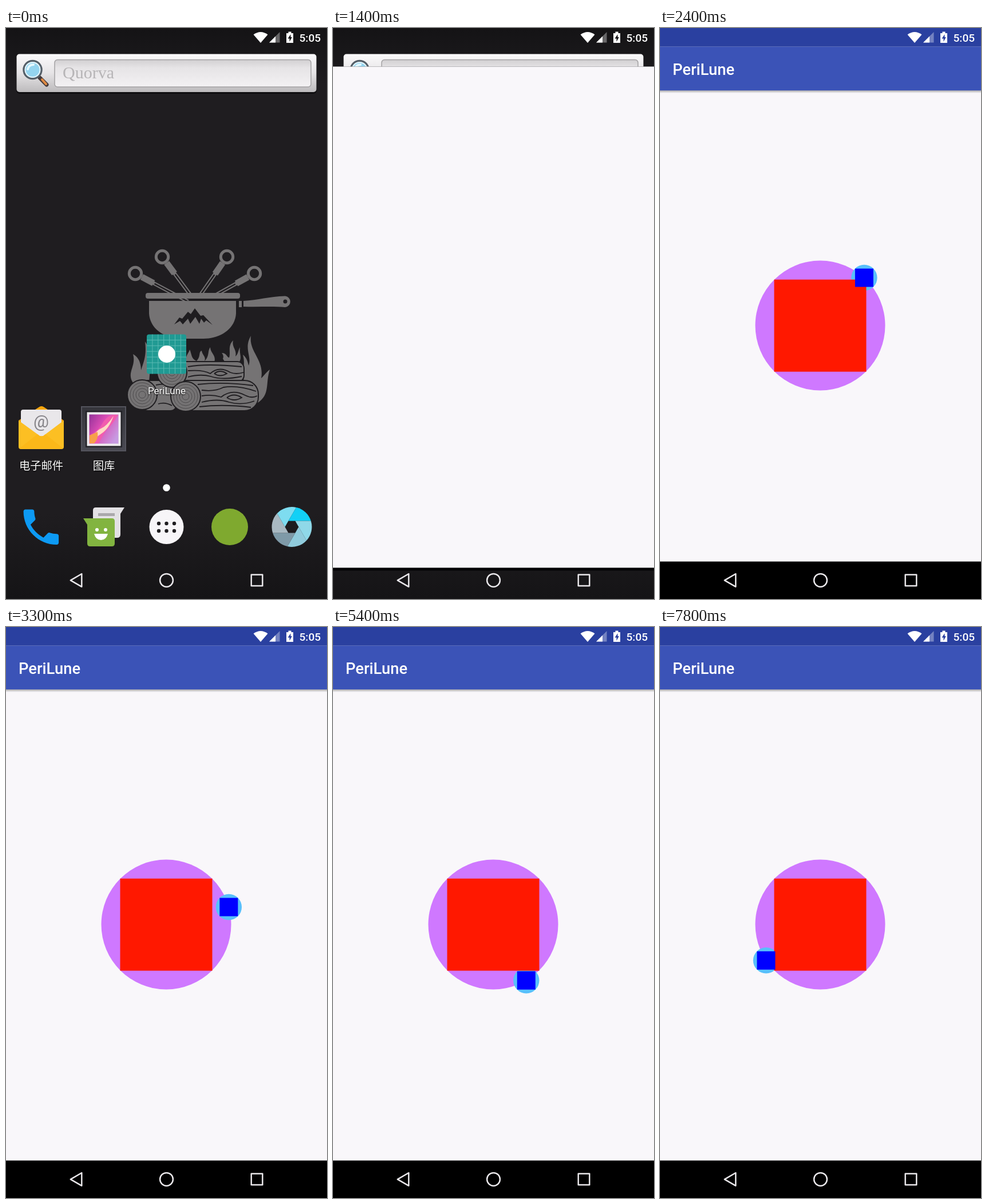
An HTML page for the animation above (8 s loop, 561 px wide and 998 px high).

```html
<!DOCTYPE html>
<html lang="zh">
<head>
<meta charset="utf-8">
<style>
html, body { margin: 0; width: 100%; height: 100%; overflow: hidden; background: #1f1d20; }
svg { display: block; width: 100vw; height: 100vh; }
text { font-family: Roboto, "Noto Sans CJK SC", "Noto Sans CJK", sans-serif; fill: #fff; }
.label { text-anchor: middle; filter: drop-shadow(0 1px 1px #000); }
.g { fill: #757374; }
.gs { stroke: #757374; fill: none; }
.d { fill: #1f1d20; }
.ds { stroke: #1f1d20; fill: none; }
</style>
</head>
<body>
<svg viewBox="0 0 561 998">
  <defs>
    <linearGradient id="wall" x2="0" y2="1">
      <stop stop-color="#141315"/><stop offset=".1" stop-color="#1f1d20"/>
      <stop offset=".85" stop-color="#1f1d20"/><stop offset="1" stop-color="#151416"/>
    </linearGradient>
    <linearGradient id="plate" x2="0" y2="1">
      <stop stop-color="#fbfafb"/><stop offset=".5" stop-color="#e6e4e6"/><stop offset="1" stop-color="#bcbabc"/>
    </linearGradient>
    <linearGradient id="field" x2="0" y2="1">
      <stop stop-color="#d2d0d2"/><stop offset=".3" stop-color="#e6e4e6"/><stop offset="1" stop-color="#f3f1f3"/>
    </linearGradient>
    <linearGradient id="frame" x2="0" y2="1">
      <stop stop-color="#34343a"/><stop offset="1" stop-color="#4a4a53"/>
    </linearGradient>
    <linearGradient id="photo" x2="1" y2=".6">
      <stop stop-color="#8c2f96"/><stop offset=".45" stop-color="#d94bb4"/><stop offset="1" stop-color="#c79be2"/>
    </linearGradient>
    <linearGradient id="shade" x2="0" y2="1">
      <stop stop-color="#000" stop-opacity=".32"/><stop offset="1" stop-color="#000" stop-opacity="0"/>
    </linearGradient>
  </defs>

  <g id="home">
    <rect width="561" height="998" fill="url(#wall)"/>

    <g id="forks"></g>
    <rect class="g" x="244" y="463" width="165" height="10" rx="4"/>
    <path class="g" d="M250 477H402V499C400 528 372 543 345 543H308C280 543 252 528 250 499Z"/>
    <path class="g" d="M407 477h5v11h-5zM415 477C440 476 460 469 488 468.500A9.800 9.800 0 0 1 488 488C465 486 440 488 415 487Z"/>
    <circle class="d" cx="488" cy="478" r="3.500"/>
    <path class="d" d="M294 518L303 506 308 508 318 496 323 500 330 490 340 503 345 502 361 519 350 511 346 515 341 508 338 517 331 505 322 517 318 508 309 518 304 512Z"/>

    <path class="g" d="M222 620C210 602 228 592 222 570C235 577 236 592 236 598C241 582 246 572 243 548C252 560 254 580 250 618Z
      M440 655C462 640 453 622 461 597C454 602 449 610 446 612C452 580 424 566 428 538C415 560 430 574 424 590C422 580 419 575 414 571C419 590 412 595 416 618Z
      M314 586C313 572 320 568 321 562C325 570 323 578 333 582C341 574 336 566 342 564C343 572 350 574 347 582C356 574 352 564 357 558C357 568 368 572 364 584Z
      M379 578C381 574 379 570 377 568C386 568 386 576 390 576C393 566 387 556 397 546C394 558 404 562 401 574C406 570 406 562 409 558C407 570 414 576 406 586H384Z"/>
    <g class="g" stroke="#1f1d20" stroke-width="2">
      <rect x="270" y="583" width="146" height="36" rx="12"/>
      <rect x="292" y="616" width="149" height="53" rx="24"/>
      <rect x="238" y="616" width="60" height="53" rx="10"/>
    </g>
    <g class="ds" stroke-width="1.800">
      <path d="M318 592Q350 586 412 592M318 599Q345 597 357 604 372 590 392 602 402 606 415 602M318 610Q340 604 358 609 378 616 412 609M364 604q10-8 22 0-12 7-22 0
        M335 623Q380 618 432 625M342 633Q365 636 380 628 405 624 437 635M342 643Q360 640 376 645 395 630 418 642 430 648 439 643M342 654Q370 647 390 654 412 660 434 652M338 662Q380 657 428 663M386 646q12-9 26 0-13 8-26 0
        M262 624Q280 620 294 626M266 657Q278 653 290 660"/>
    </g>
    <g id="logs"></g>

    <rect x="18" y="48" width="525" height="67" rx="6" opacity=".5"/>
    <rect x="18.500" y="45.500" width="524" height="66.500" rx="5" fill="url(#plate)"/>
    <rect x="85" y="55.500" width="448" height="47.500" rx="5" fill="url(#field)" stroke="#a3a1a3" stroke-width="1.500"/>
    <g fill="none" stroke-linecap="round">
      <path d="M59 87l12 12" stroke="#453a3a" stroke-width="7"/>
      <path d="M63 90l7 8" stroke="#e08a42" stroke-width="4"/>
      <circle cx="46.500" cy="73" r="15.500" fill="#94d4ef" stroke="#555f68" stroke-width="3.500"/>
      <circle cx="46.500" cy="73" r="13" stroke="#e4f4fb" stroke-width="2"/>
      <path d="M38 72q2-8 10-8" stroke="#e4f8ff" stroke-width="4"/>
    </g>
    <text x="99" y="88" font-size="30" style="font-family:'Liberation Serif',serif;fill:#b7b5b7">Quorva</text>

    <rect x="246" y="535.500" width="69" height="69" rx="4" fill="#209a93"/>
    <path id="grid" fill="none" stroke="#5bbab3" stroke-width="1"/>
    <circle cx="281" cy="570" r="15" fill="#fff"/>
    <text class="label" x="281" y="640" font-size="17">PeriLune</text>

    <path d="M22 686L57 663Q62 659 67 663L101 686V715H22Z" fill="#f5a50a"/>
    <rect x="26" y="667" width="71" height="56" rx="4" fill="#e9e7ea"/>
    <text x="61.500" y="698" font-size="30" text-anchor="middle" style="fill:#858388">@</text>
    <path d="M22 686L55 710Q62 717 69 710L101 686V732Q101 736 97 736H26Q22 736 22 732Z" fill="#fcbf23"/>
    <path d="M23 735L55 710Q62 717 69 710L100 735Z" fill="#fbb819"/>
    <text class="label" x="61.500" y="772" font-size="19.300">电子邮件</text>

    <rect x="131" y="661" width="79" height="79" fill="url(#frame)"/>
    <rect x="132" y="662" width="77" height="77" fill="none" stroke="#54545d" stroke-width="2"/>
    <rect x="139" y="669" width="64" height="64" fill="#222227"/>
    <rect x="143.500" y="673.500" width="55" height="55" fill="url(#photo)" stroke="#eeecee" stroke-width="4"/>
    <path d="M146 726V712Q162 704 168 692T186 676H196Q188 690 180 698T162 726Z" fill="#f25cae"/>
    <path d="M147 724Q156 704 166 700T188 678Q180 700 168 708T147 724Z" fill="#ffd9c4"/>
    <path d="M146 726V712L160 706Q162 718 154 726Z" fill="#f7a04a"/>
    <text class="label" x="171" y="772" font-size="19.300">图库</text>

    <circle cx="280.500" cy="803.500" r="6.300" fill="#fff"/>

    <path transform="translate(20.300 831.200) scale(3.420)" fill="#0d9af4" d="M6.620 10.790c1.440 2.830 3.760 5.140 6.590 6.590l2.200-2.200c.27-.27.67-.36 1.020-.24 1.120.37 2.330.57 3.570.57.55 0 1 .45 1 1V20c0 .55-.45 1-1 1-9.390 0-17-7.610-17-17 0-.55.45-1 1-1h3.500c.55 0 1 .45 1 1 0 1.250.2 2.450.57 3.570.11.35.03.74-.25 1.020z"/>

    <path d="M207 838H157Q152 838 152 843V886Q152 891 157 891H194Q200 891 200 885V849Z" fill="#e3e1e4"/>
    <path d="M161 848h29v5h-29z" fill="#aaa8ab"/>
    <path d="M135 857H185Q190 857 190 862V901Q190 906 185 906H147Q142 906 142 901V868Z" fill="#82b440"/>
    <g fill="#fff"><circle cx="159" cy="877" r="3"/><circle cx="174" cy="877" r="3"/><path d="M154 884H178Q175 895 166 895T154 884Z"/></g>

    <circle cx="280.500" cy="872" r="30" fill="#f7f5f8"/>
    <g id="dots" fill="#1f1d20"></g>
    <circle cx="391" cy="872" r="32" fill="#7fa92f"/>
    <g id="lens"></g>
  </g>

  <g id="sheet">
    <rect id="edge" fill="#050406"/>
    <rect id="reveal" fill="#f9f7fa"/>
  </g>

  <g id="app">
    <rect width="561" height="998" fill="#f9f7fa"/>
    <rect width="561" height="32.700" fill="#2a40a0"/>
    <rect y="932.500" width="561" height="65.500"/>
    <g id="content">
      <rect y="109" width="561" height="5" fill="url(#shade)"/>
      <rect y="32.700" width="561" height="76.400" fill="#3b53b7"/>
      <circle cx="280" cy="520" r="113.500" fill="#cf78ff"/>
      <circle id="moon" r="22.700" fill="#58c0fb"/>
      <rect x="199.500" y="439.700" width="161" height="161" fill="#ff1800"/>
      <rect id="core" x="-16" y="-16" width="32" height="32" fill="#00f"/>
    </g>
    <text id="title" x="22" y="81.500" font-size="27.300" font-weight="500">PeriLune</text>
  </g>

  <g fill="#fff">
    <path d="M445 26L432.500 11.500Q445 2.500 457.500 11.500Z"/>
    <path d="M460 25.500H478.500V7Z" opacity=".35"/>
    <path d="M460 25.500H471V14.500Z"/>
    <path fill-rule="evenodd" d="M490 9H493.500V6.500H498.500V9H502V26H490ZM497.500 11L492.500 18.500H495.500V24L499.800 16H497.500Z"/>
    <text x="512.500" y="24" font-size="19.100" font-weight="500">5:05</text>
  </g>
  <g fill="none" stroke="#e9e7ea" stroke-width="2.500" stroke-linejoin="round">
    <path d="M112.800 965.300L132.300 954V976.600Z"/>
    <circle cx="280.500" cy="965.300" r="11.400"/>
    <rect x="428.700" y="955.500" width="19.600" height="19.600"/>
  </g>
</svg>
<script>
const $ = id => document.getElementById(id);
const set = (el, attrs) => Object.entries(attrs).forEach(([k, v]) => el.setAttribute(k, v));
const line = (a, b, w, cls) =>
  `<line class="${cls}" x1="${a[0]}" y1="${a[1]}" x2="${b[0]}" y2="${b[1]}" stroke-width="${w}"/>`;

// ring centre, then where the shaft ends at the pot
$('forks').innerHTML = [[226, 429, 318, 478], [273, 400, 322, 466], [386, 400, 340, 466], [434, 429, 364, 468]]
  .map(([x, y, ex, ey]) => {
    const len = Math.hypot(ex - x, ey - y);
    const at = d => [x + (ex - x) * d / len, y + (ey - y) * d / len];
    return line(at(30), [ex, ey], 6.5, 'gs') + line(at(38), [ex, ey], 2.5, 'ds') +
      line(at(13), at(36), 11, 'gs') +
      `<circle class="gs" cx="${x}" cy="${y}" r="10.7" stroke-width="5"/>`;
  }).join('');

$('logs').innerHTML = [[290, 602], [238, 641], [314, 644]].map(([x, y]) =>
  `<circle class="g" cx="${x}" cy="${y}" r="26" stroke="#1f1d20" stroke-width="2"/>` +
  [21, 16, 11, 6].map(r => `<circle class="ds" cx="${x}" cy="${y}" r="${r}" stroke-width="1" opacity=".45"/>`).join('')
).join('');

let grid = '';
for (let i = 1; i < 7; i++) grid += `M${246 + i * 9.9} 535.5v69M246 ${535.5 + i * 9.9}h69`;
set($('grid'), { d: grid });

for (const x of [267, 280.5, 294])
  for (const y of [866, 879]) $('dots').innerHTML += `<circle cx="${x}" cy="${y}" r="3.2"/>`;

const polar = (r, deg) => {
  const a = deg * Math.PI / 180;
  return [499.5 + r * Math.cos(a), 872 + r * Math.sin(a)].map(v => v.toFixed(1)).join(' ');
};
$('lens').innerHTML = ['#90cbdc', '#7f9aa8', '#a9b9c2', '#7edcf0', '#12d0f6', '#8fd8e8'].map((fill, i) => {
  const a = i * 60, tip = a + 102.7;
  return `<path fill="${fill}" d="M${polar(12, a)}L${polar(35, tip - 60)}A35 35 0 0 1 ${polar(35, tip)}L${polar(12, a + 60)}Z"/>`;
}).join('');

const LOOP = 8000;
const steps = [0, 1000, 1200, 1400, 1700, 1900, 2200, 2400, 2600, 2800, 3000, 3100, 3300, 3500, 3700,
  4000, 4200, 4400, 4600, 4700, 4900, 5000, 5200, 5400, 5600, 5800, 6000, 6100,
  6300, 6500, 6700, 6900, 7000, 7200, 7300, 7500, 7700, 7800];
// time and orbit angle in degrees, clockwise from the top
const orbit = [[1900, 25], [3300, 74.4], [3700, 84], [5000, 129], [5400, 149.4],
  [6100, 174], [6300, 181.8], [7300, 215], [7800, 236.4]];

function angleAt(t) {
  const i = Math.max(1, orbit.findIndex(k => k[0] >= t));
  const [t0, a0] = orbit[i - 1], [t1, a1] = orbit[i];
  return a0 + (a1 - a0) * (t - t0) / (t1 - t0);
}

function draw(now) {
  const time = now % LOOP;
  const t = steps.filter(s => s <= time).pop();
  const inApp = t >= 1700;

  // the window grows out of the launcher icon
  const grow = { 1000: .12, 1200: .5, 1400: .874 }[t] || 0;
  const wide = Math.min(1, grow * 1.3);
  const x = 246 * (1 - wide), y = 535 * (1 - grow);
  const width = 69 + 492 * wide, height = 604 + 394 * grow - y;
  set($('reveal'), { x, y, width, height: height - 5 });
  set($('edge'), { x, y, width, height });
  $('sheet').style.display = grow ? '' : 'none';

  $('app').style.display = inApp ? '' : 'none';
  const fade = t < 1900 ? 0 : t < 2200 ? .77 : 1;
  $('content').style.opacity = fade;
  $('title').style.opacity = fade ? 1 : 0;
  if (inApp) {
    const a = angleAt(t) * Math.PI / 180;
    const transform = `translate(${280 + 113.5 * Math.sin(a)} ${520 - 113.5 * Math.cos(a)})`;
    set($('moon'), { transform });
    set($('core'), { transform });
  }
  requestAnimationFrame(draw);
}
requestAnimationFrame(draw);
</script>
</body>
</html>
```
